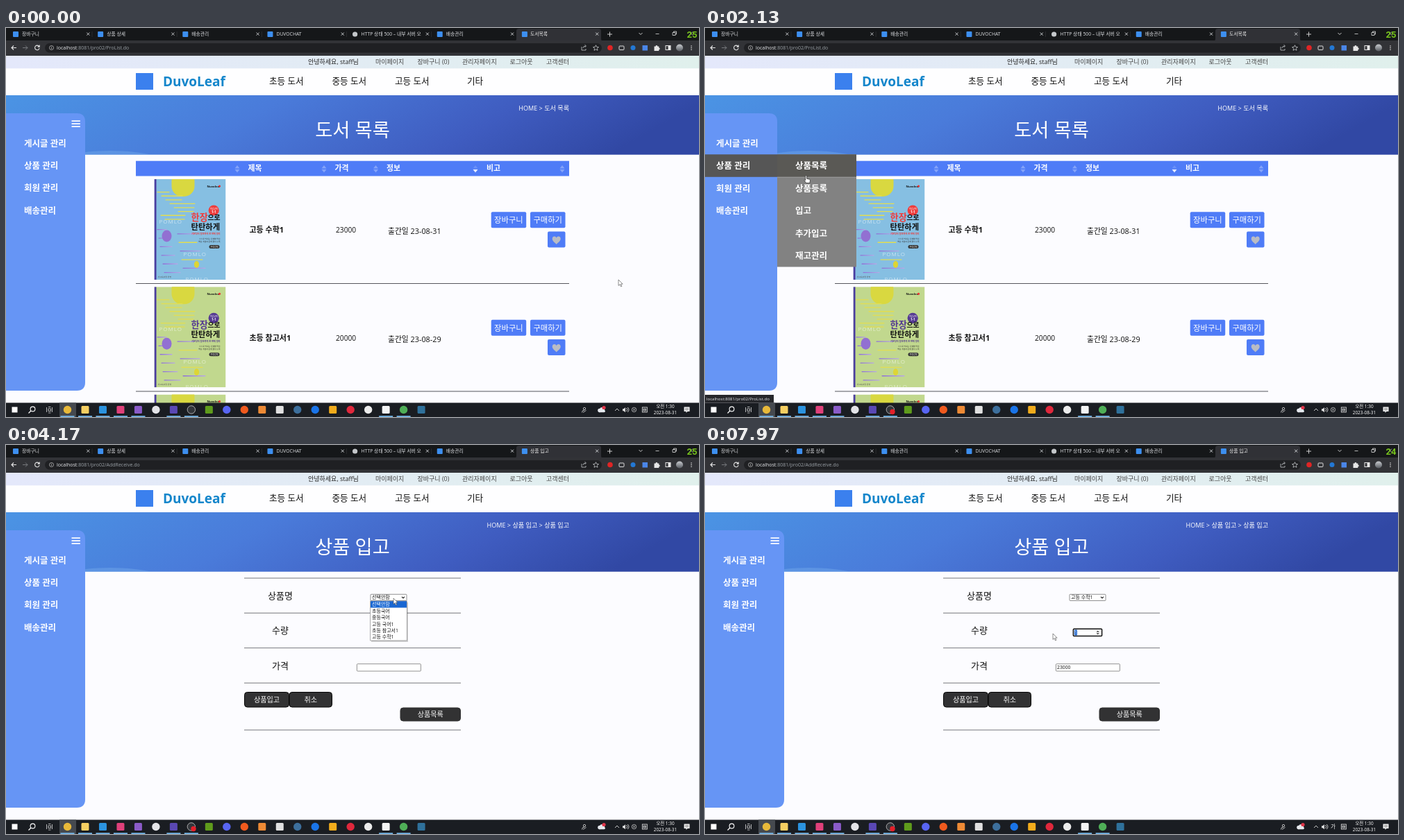
Write an HTML page that moves like this. It is 998 px wide and 561 px high and loops after 8000 ms.

```html
<!DOCTYPE html>
<html lang="ko">
<head>
<meta charset="utf-8">
<style>
html, body { margin: 0; width: 100%; height: 100%; overflow: hidden; background: #fcfcff; }
svg { display: block; }
#stage { width: 100vw; height: 100vh; }
text { font-family: 'Open Sans', 'Noto Sans CJK KR', 'Noto Sans CJK', sans-serif; white-space: pre; }
</style>
</head>
<body>
<svg id="stage" viewBox="0 0 998 561">
  <defs>
    <linearGradient id="sky" x2="1" y2=".15">
      <stop stop-color="#4b94e4"/><stop offset=".4" stop-color="#4a7bda"/>
      <stop offset=".75" stop-color="#3f5cc0"/><stop offset="1" stop-color="#3148a4"/>
    </linearGradient>
    <linearGradient id="bar"><stop stop-color="#e4e8fb"/><stop offset="1" stop-color="#e0f0ec"/></linearGradient>
    <linearGradient id="photo" x2="0" y2="1"><stop stop-color="#c9ccd0"/><stop offset="1" stop-color="#565a60"/></linearGradient>
    <linearGradient id="violet"><stop stop-color="#8d6fd6"/><stop offset="1" stop-color="#b9a8e8"/></linearGradient>
    <clipPath id="bannerClip"><rect y="97" width="998" height="85.7"/></clipPath>
  </defs>
</svg>
<script>
const LOOP = 8000, HOVER = 1200, LOAD = 3420, OPEN = 4060, PICK = 4720, FOCUS = 6260;
const BLUE = '#4f7cf7', INK = '#111', WHITE = '#fff';
const BOLD = 'font-weight="700"', MID = 'text-anchor="middle"', END = 'text-anchor="end"';

const rect = (x, y, w, h, fill, more = '') =>
  `<rect x="${x}" y="${y}" width="${w}" height="${h}" fill="${fill}" ${more}/>`;
const dot = (x, y, r, fill, more = '') => `<circle cx="${x}" cy="${y}" r="${r}" fill="${fill}" ${more}/>`;
const oval = (x, y, rx, ry, fill, more = '') =>
  `<ellipse cx="${x}" cy="${y}" rx="${rx}" ry="${ry}" fill="${fill}" ${more}/>`;
const text = (x, y, s, size, fill = INK, more = '') =>
  `<text x="${x}" y="${y}" font-size="${size}" fill="${fill}" ${more}>${s}</text>`;
const line = (d, color, w = 1, more = '') =>
  `<path d="${d}" fill="none" stroke="${color}" stroke-width="${w}" ${more}/>`;
const shape = (d, fill, more = '') => `<path d="${d}" fill="${fill}" ${more}/>`;
const group = (id, body, more = '') => `<g id="${id}" ${more}>${body}</g>`;
const range = (n, f) => Array.from({ length: n }, (_, i) => f(i)).join('');

function browser() {
  const tabs = ['장바구니', '상품 상세', '배송관리', 'DUVOCHAT', 'HTTP 상태 500 – 내부 서버 오', '배송관리', ''];
  let s = rect(0, 0, 998, 19, '#151719') + shape('M732 19Q735 19 735 15V4Q735 1 739 1H853Q857 1 857 4V15Q857 19 860 19Z', '#303136');
  tabs.forEach((name, i) => {
    const x = i * 122.15;
    s += i === 4 ? dot(x + 14, 9, 3.6, '#c4c7ca') : rect(x + 10, 5, 8, 8, '#3d8ff0', 'rx="1"');
    s += text(x + 23, 11.4, name, 6.8, '#dfe1e5');
    s += line(`M${x + 116.3} 6.6l4 4m0 -4l-4 4`, '#dfe1e5', .9);
    if (i < 5) s += line(`M${x + 124} 5v8`, '#3a3b3e', .6);
  });
  s += text(755, 11.4, '', 6.8, '#eee', 'id="tab"');
  s += line('M866 9h7m-3.5 -3.5v7M911.5 7l2.5 2.5 2.5 -2.5', '#ddd', .9);
  s += line('M935.5 8.5h5M960 6.5h4v4h-4zM961.5 6.5v-1.5h4v4h-1.5M984 5.5l5 5m0 -5l-5 5', '#ddd', .8);
  s += text(980.5, 14, '', 13, '#76c21c', 'id="fps" font-weight="700" style="font-family:Roboto,sans-serif"');

  s += rect(0, 18, 998, 22, '#323337') + rect(56, 22, 802, 13.5, '#1f2023', 'rx="6.7"');
  s += line('M15 28.5h-7m3 -3l-3 3 3 3', '#e6e6e6', 1.1) + line('M24 28.5h7m-3 -3l3 3 -3 3', '#77797d');
  s += line('M47.7 26.7a3.3 3.3 0 1 0 .4 2.5M48.2 24.6v2.5h-2.5', '#e6e6e6', 1.1);
  s += dot(65.5, 28.5, 3, 'none', 'stroke="#bbb" stroke-width=".8"') + line('M65.5 28v2.2M65.5 26.6v.8', '#bbb', .8);
  s += `<text x="73" y="31" font-size="7" fill="#e9eaed">localhost<tspan id="url" fill="#9aa0a6"></tspan></text>`;
  s += line('M829 27v5h6v-2M831 29q0 -3 4 -3m-1.5 -1.8l2 1.8 -2 1.8', '#c4c7ca', .8);
  s += line('M849.5 24.7l1.2 2.6 2.8 .3 -2.1 1.9 .6 2.8 -2.5 -1.5 -2.5 1.5 .6 -2.8 -2.1 -1.9 2.8 -.3z', '#c4c7ca', .8);
  s += dot(870, 28.5, 3.8, '#e02525') + rect(883, 26, 7, 5.5, 'none', 'stroke="#ddd" rx="1"');
  s += dot(903, 28.5, 3.5, '#2378d4') + rect(916.5, 25, 7.5, 7.5, '#4a86e8');
  s += shape('M933.5 26.5h2a1.4 1.4 0 0 1 2.8 0h2v2a1.4 1.4 0 0 1 0 2.8v1.7h-6.8z', '#e6e6e6');
  s += rect(950, 25.5, 7, 6, 'none', 'stroke="#e6e6e6"') + rect(953.5, 25.5, 3.5, 6, '#e6e6e6');
  s += dot(970, 28.5, 5, 'url(#photo)') + range(3, i => dot(987, 26 + i * 2.6, .8, '#e0e0e0'));
  return s;
}

function header() {
  let s = rect(0, 40, 998, 501, '#fcfcff') + rect(0, 40, 998, 18.5, 'url(#bar)') + rect(0, 58.5, 998, 39, '#fefeff');
  s += text(435, 52.3, '안녕하세요, staff님', 9, '#222');
  [['마이페이지', 532], ['장바구니 (0)', 592.5], ['관리자페이지', 657], ['로그아웃', 725.5], ['고객센터', 778]]
    .forEach(([name, x]) => s += text(x, 52.3, name, 9, '#444'));
  s += rect(187, 65, 25, 24, '#3b80ee') + text(226, 83.5, 'DuvoLeaf', 19, '#1486cb', BOLD);
  [['초등 도서', 379], ['중등 도서', 469.5], ['고등 도서', 560], ['기타', 664]]
    .forEach(([name, x]) => s += text(x, 81.3, name, 12.6));
  s += rect(0, 97, 998, 85.7, 'url(#sky)') + oval(150, 202, 92, 25, '#7fb4ee', 'opacity=".35" clip-path="url(#bannerClip)"');
  s += text(499, 157, '', 27.3, WHITE, `${MID} id="title" font-weight="300"`);
  return s + text(811, 119, '', 9.1, WHITE, `${END} id="crumb"`);
}

function cover(y, bg, accent) {
  const bar = (x, y, w, c) => rect(x, y, w, 1.3, c, 'rx=".6"');
  const brand = (x, y) => text(x, y, 'POMLO', 8, '#fff', 'opacity=".55" letter-spacing="1"');
  let s = rect(0, 0, 103, 145, bg) + rect(25, -12, 33, 37, '#d9d840', 'rx="15"');
  s += range(8, i => bar(4 + i * 37 % 31, 18 + i * 5.6, 18 + i * 13 % 20, '#e3dd50'));
  s += range(11, i => bar(4 + i * 29 % 56, 72 + i * 6.2, 14 + i * 11 % 20, i % 4 === 3 ? '#e3dd50' : 'url(#violet)'));
  s += oval(18, 82, 7, 8.5, '#9270d2') + oval(61, 123, 3.6, 5, '#ddd535');
  s += brand(7, 64) + brand(42, 111) + brand(45, 147) + rect(0, 0, 3, 145, '#4b3da0');
  s += text(76, 11.5, 'Nuvolear', 4.2, INK, BOLD) + dot(94, 10, 1.6, '#e33');
  s += dot(85.7, 45, 7.6, accent) + text(85.7, 44, '개념교재', 3, WHITE, MID) + text(85.7, 48.5, '1-1', 4.5, WHITE, `${MID} ${BOLD}`);
  s += text(53, 59.5, '한장', 13.2, accent, 'font-weight="900"') + text(77, 59, '으로', 9.8, INK, BOLD);
  s += text(53, 73, '탄탄하게', 11.3, INK, 'font-weight="900"');
  s += text(95, 80, '기본부터 실전까지 한 번에 정리', 3.2, accent, `${END} ${BOLD}`);
  s += text(95, 87, '스스로 익히는 단계별 학습', 2.8, '#333', END) + text(95, 91, '핵심 개념과 문제 풀이 수록', 2.8, '#333', END);
  s += rect(79, 95, 15, 5, '#333', 'rx="2.5"') + text(86.5, 98.6, '무료강의', 3, WHITE, MID);
  s += text(5, 142, '새 교육과정 반영', 2.8, '#555');
  return `<svg x="213.5" y="${y}" width="103" height="145">${s}</svg>`;
}

function bookRow(y, title, price, date) {
  const button = (x, name) => rect(x, y + 47.3, 50.5, 23, BLUE, 'rx="2"') + text(x + 25.2, y + 63, name, 11.3, WHITE, MID);
  return text(350.5, y + 77.2, title, 11, INK, BOLD) + text(475, y + 77.2, price, 10.2) +
    text(550, y + 79.3, `출간일 ${date}`, 10.8) + button(698.7, '장바구니') + button(755, '구매하기') +
    rect(780, y + 75.6, 25.5, 23, BLUE, 'rx="2"') +
    shape(`M792.7 ${y + 94}c-3 -3 -6 -5 -6 -8.2c0 -4 5 -4.5 6 -1c1 -3.5 6 -3 6 1c0 3.2 -3 5.2 -6 8.2z`, '#b9bcc4') +
    rect(187, y + 150, 624, 1, '#55565c');
}

function bookList() {
  let s = rect(187, 191.7, 624, 21.8, BLUE);
  [['제목', 348.5], ['가격', 473.5], ['정보', 548], ['비고', 692]].forEach(([name, x]) => s += text(x, 206.4, name, 10.9, WHITE, BOLD));
  [333, 458, 532.5, 676, 801].forEach(x => {
    const on = x === 676;
    s += shape(`M${x - 3.5} 202.5l3.5 -4.5 3.5 4.5z`, WHITE, `opacity="${on ? .15 : .3}"`);
    s += shape(`M${x - 3.5} 204l3.5 4.5 3.5 -4.5z`, WHITE, `opacity="${on ? .85 : .3}"`);
  });
  s += cover(218, '#86bfe2', '#ee3d3d') + cover(373.3, '#c1d88e', '#553a92') + cover(528.6, '#c1d88e', '#553a92');
  return s + bookRow(218, '고등 수학1', 23000, '23-08-31') + bookRow(373.5, '초등 참고서1', 20000, '23-08-29');
}

function form() {
  const field = (x, y, w, h, id) => rect(x, y, w, h, WHITE, `id="${id}" rx="1"`);
  let s = [192, 242.3, 292.7, 343.2, 411].map(y => rect(343, y - .5, 312, 1, '#77787c')).join('');
  ['상품명', '수량', '가격'].forEach((name, i) => s += text(395, 221.7 + i * 50.4, name, 13, INK, MID));
  const button = (x, y, w, h, name, edge) => rect(x, y, w, h, '#323233', `rx="4" stroke="${edge}"`) + text(x + w / 2, y + h / 2 + 3.7, name, 10.1, WHITE, MID);
  s += button(343.5, 356.5, 64, 21.5, '상품입고', '#050505') + button(408, 356.5, 61.5, 21.5, '취소', '#050505');
  s += button(568, 379, 86.5, 19, '상품목록', '#323233');
  s += field(525, 215.3, 52, 9.2, 'select') + text(527, 222.3, '', 7, INK, 'id="choice"') + line('M570 218.8l2 2 2 -2', INK, 1.1);
  s += field(530.4, 265.2, 41.2, 10.4, 'qty') + rect(532, 266.6, 4, 7.8, '#2267cc', 'id="mark"') + text(532, 273, '1', 6.8, INK, 'id="count"');
  s += group('spin', shape('M563.5 269.7l2.2 -2.2 2.2 2.2zM563.5 271.2l2.2 2.2 2.2 -2.2z', '#444'));
  s += rect(505.4, 315.7, 92, 10.4, WHITE, 'stroke="#777" stroke-width=".8" rx="1"') + text(507, 323.4, '23000', 6.8, INK, 'id="price"');
  const names = ['선택안함', '초등국어', '중등국어', '고등 국어1', '초등 참고서1', '고등 수학1'];
  let list = rect(526, 227, 53, 57, '#000', 'opacity=".18"') + rect(524.7, 225, 52.6, 57, WHITE, 'stroke="#888" stroke-width=".7"');
  list += rect(525, 225.2, 52, 9.4, '#1967d2', 'id="pick"');
  list += names.map((name, i) => text(527, 232.3 + i * 9.4, name, 7, INK, 'class="option"')).join('');
  return s + group('list', list);
}

function sidebar() {
  const names = ['게시글 관리', '상품 관리', '회원 관리', '배송관리'];
  const subNames = ['상품목록', '상품등록', '입고', '추가입고', '재고관리'];
  const panel = shape('M-10 123H102Q114 123 114 135V511Q114 523 102 523H-10Z', '#6695f5') + rect(-10, 182.3, 124, 32.5, '#565656', 'id="itemHot"') +
    names.map((name, i) => text(26, 170.6 + i * 32.4, name, 12.5, WHITE, `${BOLD} class="item"`)).join('');
  const sub = rect(104, 182.3, 114, 162.2, '#828282') + rect(104, 0, 114, 32.5, '#5a5955', 'id="subHot"') + rect(104, 0, 114, .7, '#aaa', 'id="subEdge"') +
    subNames.map((name, i) => text(130, 202.8 + i * 32.5, name, 12.5, WHITE, `${BOLD} class="sub"`)).join('');
  return group('panel', panel) + group('burger', range(3, i => rect(94.5, 133.3 + i * 4, 12.3, 1.7, WHITE))) + group('submenu', sub);
}

function taskbar() {
  let s = rect(0, 540.5, 998, 20.5, '#1a1d22') + rect(77, 540.5, 24, 20.5, '#45494f');
  s += rect(8.5, 546.5, 8, 8, WHITE) + dot(38.5, 549.5, 3.4, 'none', 'stroke="#fff" stroke-width="1.1"') + line('M36 552l-3.5 3.5', WHITE, 1.2);
  s += line('M58.5 547v7M61 549h3.5v3.5h-3.5zM61 546.5h3.5M61 555h3.5M66.5 547v7', '#ddd', .8);
  const apps = '#e8b93a #f5cf62 #2b93df #e0407a #8a5bc8 #e4e4e8 #5a48b4 #33363b #5f9c1c #5865f2 #f05a1e #ee8a35 #e0e0e0 #3d6f9c #1a74e8 #f2ac1c #e0283c #ececec #f4f4f4 #4fae57 #2f719b'.split(' ');
  const square = [1, 2, 3, 4, 6, 8, 11, 12, 15, 18, 20], running = [0, 1, 2, 3, 4, 6, 7, 18, 19];
  apps.forEach((c, i) => {
    const x = 88.5 + i * 25.48, edge = i === 7 ? 'stroke="#ccc" stroke-width=".8"' : '';
    s += square.includes(i) ? rect(x - 5.5, 545, 11, 11, c, 'rx="1.5"') : dot(x, 550.5, 5.7, c, edge);
    if (running.includes(i)) s += rect(x - 10, 559.3, 20, 1.7, '#76b9ed');
  });
  s += dot(270, 553.5, 3.7, '#e5202a', 'id="rec"');
  s += dot(833, 549, 1.7, 'none', 'stroke="#ddd" stroke-width=".8"') + line('M829.5 554.5q0 -3.5 3.5 -3.5M831 554.5l4.5 -3', '#ddd', .8);
  s += dot(855, 551.5, 2.8, '#e6e9ee') + dot(858.5, 550.5, 3.6, '#e6e9ee') + rect(853, 551, 10, 3.2, '#e6e9ee', 'rx="1.6"') + dot(861, 547.5, 2.6, '#e0364a');
  s += line('M877 552l3 -3 3 3M893.5 548q2.5 2.5 0 5M895.3 547q3.3 3.5 0 7', '#ddd', .9) + shape('M888 549.2h1.5l2.5 -2v7l-2.5 -2h-1.5z', '#ddd');
  s += group('net', dot(904.5, 550.5, 3.2, 'none', 'stroke="#ccc" stroke-width=".8"') + line('M903 549l3 3m0 -3l-3 3', '#ccc', .8));
  s += text(904.5, 553.3, '가', 7.5, WHITE, `${MID} id="ime"`);
  s += rect(916.3, 547, 7, 7, 'none', 'stroke="#eee" stroke-width=".8"') + line('M918 549h3.5v3.2h-3.5zM918 550.6h3.5', '#eee', .7);
  s += text(949.5, 548.3, '오전 1:30', 6.4, WHITE, MID) + text(949.5, 557.4, '2023-08-31', 6.4, WHITE, MID);
  return s + shape('M976.5 546.5h8v6.5h-3l-2 2v-2h-3z', '#f2f2f2') + line('M978 548.7h5m-5 2h5', '#333', .6);
}

function pointers() {
  const edge = color => `stroke="${color}" stroke-width=".6"`;
  return group('arrow', shape('M0 0v8.5l2 -1.8 1.5 3.3 1.4 -.6 -1.5 -3.2h2.7z', WHITE, edge('#444'))) +
    group('hand', shape('M-1.2 .8a1 1 0 0 1 2 0v3.4l4 1q1 .4 .9 1.7l-.7 3.6h-5l-3 -4q.7 -1.2 2 .2z', WHITE, edge('#111'))) +
    group('beam', line('M-1.8 -4q1.8 0 1.8 1.2v5.6q0 1.2 -1.8 1.2M1.8 -4q-1.8 0 -1.8 1.2M1.8 4q-1.8 0 -1.8 -1.2', '#222', .8));
}

const stage = document.getElementById('stage');
stage.insertAdjacentHTML('beforeend', header() + group('books', bookList()) + group('form', form()) + sidebar() +
  group('status', rect(0, 529, 0, 11.5, '#26272b', 'id="statusBox"') + text(2, 537, '', 6.1, '#e4e6ea', 'id="statusText"')) +
  browser() + taskbar() + pointers());

const el = {};
stage.querySelectorAll('[id]').forEach(n => el[n.id] = n);
const all = name => [...stage.getElementsByClassName(name)];
const items = all('item'), subs = all('sub'), options = all('option');
const set = (id, key, value) => el[id].setAttribute(key, value);
const show = (id, on) => set(id, 'display', on ? 'inline' : 'none');
const write = (id, s) => { if (el[id].textContent !== s) el[id].textContent = s; };
const move = (id, x, y = 0) => set(id, 'transform', `translate(${x} ${y})`);

// Pointer stops: time, x, y
const path = [
  [0, 882, 363], [220, 882, 363], [830, 393, 282], [1180, 118, 212], [1450, 66, 198], [1750, 66, 198],
  [2050, 140, 205], [2480, 159, 268.5], [3440, 159, 268.5], [3940, 558, 221], [4200, 558, 221], [4600, 551, 277],
  [4800, 551, 277], [5350, 560, 319], [5800, 560, 319], [6180, 546, 270], [6750, 546, 270], [7400, 501, 272], [8000, 501, 272]
];

// Monotone cubic through the stops, so the pointer never overshoots
function along(t, axis) {
  const i = Math.max(0, path.findIndex(p => p[0] > t) - 1);
  const slope = k => path[k + 1] ? (path[k + 1][axis] - path[k][axis]) / (path[k + 1][0] - path[k][0]) : 0;
  const tangent = k => {
    const a = k ? slope(k - 1) : 0, b = slope(k);
    return a * b > 0 ? 2 * a * b / (a + b) : 0;
  };
  const h = path[i + 1][0] - path[i][0], u = (t - path[i][0]) / h, v = 1 - u;
  return path[i][axis] * v * v * (1 + 2 * u) + path[i + 1][axis] * u * u * (3 - 2 * u) +
    h * u * v * (v * tangent(i) - u * tangent(i + 1));
}

function drawMenu(t, x, y) {
  const hover = t >= HOVER && t < LOAD;
  const p = hover ? 1 - (1 - Math.min(1, (t - HOVER) / 330)) ** 3 : 0;
  const shift = -10 * p;
  const row = hover && x > 104 ? Math.floor((y - 182.3) / 32.5) : -1;
  move('panel', shift);
  move('burger', -106 * p);
  show('burger', p < 1);
  show('itemHot', hover);
  items.forEach((n, i) => n.setAttribute('y', 170.6 + i * 32.4 + (hover && i > 1 ? .6 : 0)));
  show('submenu', hover);
  move('submenu', shift + 10);
  show('subHot', row >= 0);
  show('subEdge', row >= 0);
  set('subHot', 'y', 182.3 + row * 32.5);
  set('subEdge', 'y', 214.8 + row * 32.5);
  subs.forEach((n, i) => n.setAttribute('y', 202.8 + i * 32.5 + (row >= 0 && i > row ? .6 : 0)));
  const link = ['ProList.do#', 'ProList.do', 'AddProduct.do', 'AddReceive.do'][row + 1];
  show('status', hover);
  write('statusText', `localhost:8081/pro02/${link}`);
  set('statusBox', 'width', row > 0 ? 109 : 99);
}

function drawForm(t, x, y) {
  const picked = t >= PICK, focus = t >= FOCUS;
  const hot = Math.max(0, Math.min(5, Math.floor((y - 225.2) / 9.4)));
  show('list', t >= OPEN && !picked);
  set('pick', 'y', 225.2 + hot * 9.4);
  options.forEach((n, i) => n.setAttribute('fill', i === hot ? WHITE : INK));
  write('choice', picked ? '고등 수학1' : '선택안함');
  const ring = (id, on) => { set(id, 'stroke', on ? '#101010' : '#777'); set(id, 'stroke-width', on ? 1.5 : .8); };
  ring('select', picked && !focus);
  ring('qty', focus);
  const marked = focus && x < 534;
  show('mark', marked);
  set('count', 'fill', marked ? WHITE : INK);
  show('count', picked);
  show('price', picked);
  const overQty = x > 530 && x < 572 && y > 265 && y < 276;
  show('spin', picked && (focus || overQty));
  return picked && (overQty || x > 505 && x < 598 && y > 315 && y < 326);
}

function draw(t) {
  const x = along(t, 1), y = along(t, 2), second = t >= LOAD;
  show('books', !second);
  show('form', second);
  write('title', second ? '상품 입고' : '도서 목록');
  write('crumb', second ? 'HOME > 상품 입고 > 상품 입고' : 'HOME > 도서 목록');
  write('tab', second ? '상품 입고' : '도서목록');
  write('url', `:8081/pro02/${second ? 'AddReceive' : 'ProList'}.do`);
  write('fps', t > 500 && t < 1400 || t > 7050 ? '24' : '25');
  show('rec', t > 400);
  show('net', t < FOCUS);
  show('ime', t >= FOCUS);
  drawMenu(t, x, y);
  const beam = drawForm(t, x, y) && second, hand = t >= HOVER && !second;
  show('beam', beam);
  show('hand', hand);
  show('arrow', !beam && !hand);
  ['beam', 'hand', 'arrow'].forEach(id => move(id, x, y));
}

const start = performance.now();
function tick() {
  draw((performance.now() - start) % LOOP);
  requestAnimationFrame(tick);
}
tick();
</script>
</body>
</html>
```
